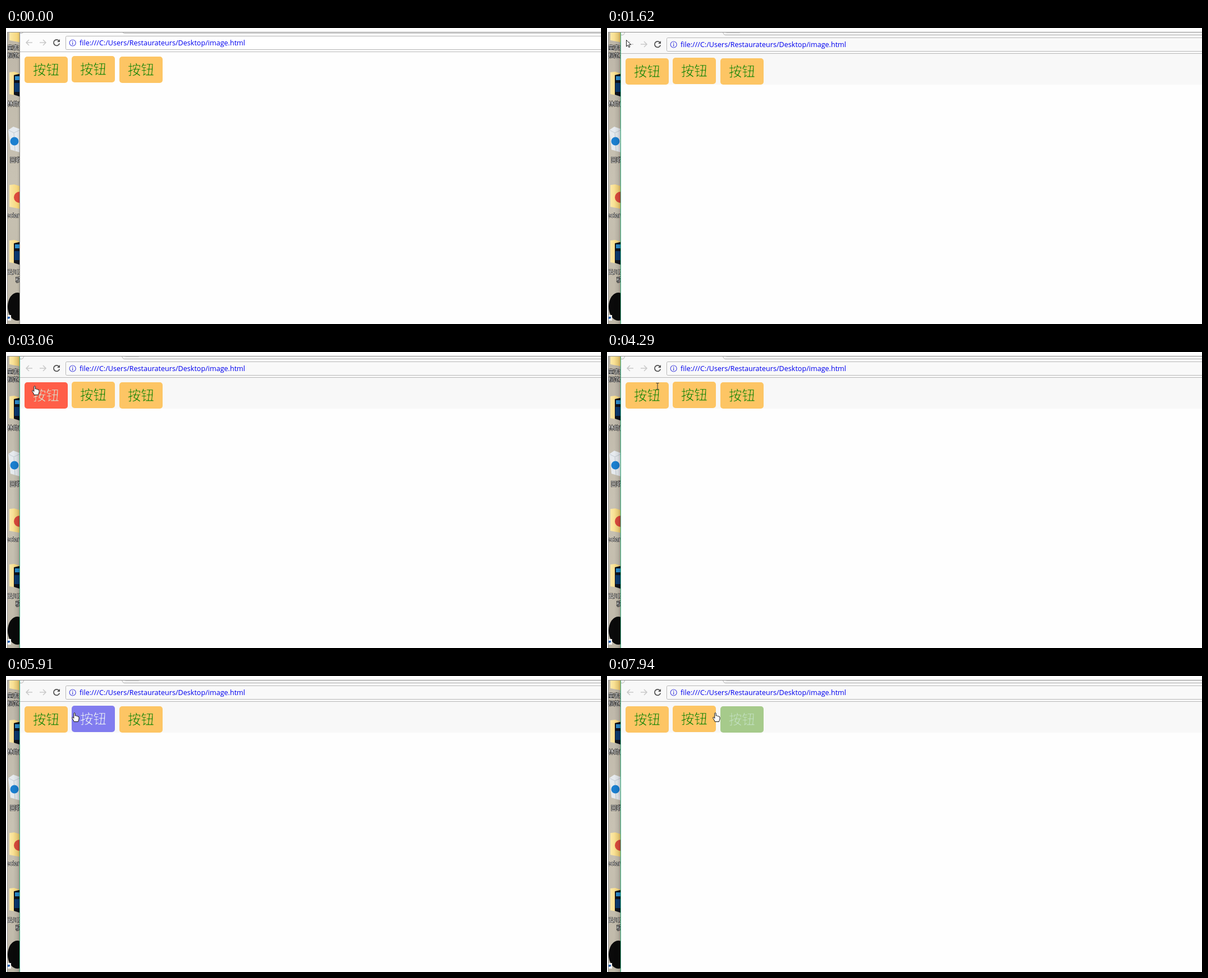
An HTML page that plays this animation: 1060x528 px, repeating every 8 s.

```html
<!DOCTYPE html>
<html lang="zh">
<head>
<meta charset="utf-8">
<title>按钮</title>
<style>
  @property --face { syntax: "<color>"; inherits: false; initial-value: #fdc564; }

  html, body { margin: 0; width: 100%; height: 100%; overflow: hidden; background: #fff; }
  .stage { --loop: 8s; position: relative; width: 1060px; height: 528px; overflow: hidden; background: #fff; }
  .stage > svg { position: absolute; left: 0; top: 0; }

  /* desktop strip */
  .label { font: 10px "Noto Sans CJK SC", "Noto Sans CJK", "Noto Sans", sans-serif; fill: #fff;
    stroke: #000; stroke-width: 1px; paint-order: stroke; }
  .focus { animation: focus var(--loop) step-end infinite; }
  @keyframes focus { 0% { opacity: 0 } 8.125% { opacity: 1 } }

  /* browser window */
  .window { position: absolute; left: 25px; top: 8px; width: 1035px; height: 520px;
    overflow: hidden; background: #fefefe; }
  .page { position: absolute; left: -25px; top: -8px; width: 1060px; height: 528px;
    animation: shift var(--loop) step-end infinite; }
  .page svg { position: absolute; overflow: visible; }
  .band { animation: focusBand var(--loop) step-end infinite; }
  @keyframes shift {
    0% { transform: translateY(0) }
    11.625% { transform: translateY(2px) }
    13.625% { transform: translateY(3px) }
  }
  @keyframes focusBand { 0% { opacity: 0 } 11.625% { opacity: 1 } }
  .url { font: 12.58px "Open Sans", "Noto Sans", sans-serif; fill: #0000f0; }

  /* the outline in the face colour thins the glyphs */
  .btn { position: absolute; width: 77px; height: 47px; top: 51px; border-radius: 5px;
    background: var(--face); color: #008000; -webkit-text-stroke: .6px var(--face);
    text-align: center; white-space: nowrap;
    font: 300 23.4px/45px "Noto Sans CJK SC", "Noto Sans CJK", sans-serif; }
  .b1 { left: 33px; animation: hover1 var(--loop) linear infinite; }
  .b2 { left: 117px; top: 50px; animation: hover2 var(--loop) linear infinite; }
  .b3 { left: 202px; animation: hover3 var(--loop) linear infinite; }

  /* two second ease in, instant reset on leaving */
  @keyframes hover1 {
    0%, 24.875% { --face: #fdc564; color: #008000; animation-timing-function: ease }
    49.875%, 52.874% { --face: #ff4a42; color: #fff }
    52.875%, 100% { --face: #fdc564; color: #008000 }
  }
  @keyframes hover2 {
    0%, 55.25% { --face: #fdc564; color: #008000; animation-timing-function: ease }
    80.25%, 85.999% { --face: #7c79f5; color: #fff }
    86%, 100% { --face: #fdc564; color: #008000 }
  }
  /* the first half of the same ease, cut by the loop */
  @keyframes hover3 {
    0%, 87.5% { --face: #fdc564; color: #008000;
      animation-timing-function: cubic-bezier(.35, .087, .455, .663) }
    100% { --face: #a3ca8d; color: #cce5cc }
  }

  /* pointer */
  .pointer { animation: move var(--loop) linear infinite; }
  @keyframes move {
    0%, 17.37% { transform: translate(26px, -30px) }
    17.375% { transform: translate(26px, -4px) }
    20.25%, 22.125% { transform: translate(34px, 21px) }
    24.875% { transform: translate(41px, 43px) }
    28.5%, 30.6% { transform: translate(48px, 55px) }
    38.25%, 45% { transform: translate(51px, 60px) }
    52.875% { transform: translate(87px, 60px) }
    53.6%, 54.375% { transform: translate(90px, 61px) }
    56.125% { transform: translate(97px, 60px) }
    65.9% { transform: translate(121px, 65px) }
    67.4%, 78.75% { transform: translate(122px, 65px) }
    86% { transform: translate(155px, 64px) }
    87.5% { transform: translate(162px, 64px) }
    89.1% { transform: translate(181px, 64px) }
    95.6%, 100% { transform: translate(193px, 65px) }
  }
  .arrow { animation: arrow var(--loop) step-end infinite; }
  .hand { animation: hand var(--loop) step-end infinite; }
  .beam { animation: beam var(--loop) step-end infinite; }
  @keyframes arrow { 0% { opacity: 1 } 24.875% { opacity: 0 } }
  @keyframes hand {
    0% { opacity: 0 } 24.875% { opacity: 1 } 52.875% { opacity: 0 }
    55.25% { opacity: 1 } 86% { opacity: 0 } 87.5% { opacity: 1 }
  }
  @keyframes beam {
    0% { opacity: 0 } 52.875% { opacity: 1 } 55.25% { opacity: 0 }
    86% { opacity: 1 } 87.5% { opacity: 0 }
  }
</style>
</head>
<body>
<div class="stage">
  <svg width="1060" height="528">
    <defs>
      <linearGradient id="wall" x2="0" y2="1">
        <stop offset="0" stop-color="#bdb6a8"/>
        <stop offset=".5" stop-color="#c8c2b3"/>
        <stop offset="1" stop-color="#c0b9a9"/>
      </linearGradient>
      <linearGradient id="paper">
        <stop offset="0" stop-color="#fbe9a8"/>
        <stop offset="1" stop-color="#f3cd68"/>
      </linearGradient>
      <linearGradient id="shade">
        <stop offset="0" stop-color="#000" stop-opacity="0"/>
        <stop offset="1" stop-color="#000" stop-opacity=".13"/>
      </linearGradient>
      <clipPath id="strip"><path d="M2 8H25V528H2z"/></clipPath>
      <path id="folder" d="M6 1L15 0L27 4V44L6 40z" fill="url(#paper)"/>
      <g id="book">
        <use href="#folder"/>
        <path d="M14 6L27 3V45L14 41z" fill="#10131c"/>
        <path d="M16 8h9v7h-9z" fill="#2d8fd0"/>
        <path d="M15 20h12v16H15z" fill="#0b3a70"/>
      </g>
    </defs>
    <g clip-path="url(#strip)">
      <path d="M2 8H25V528H2z" fill="url(#wall)"/>
      <use href="#folder" y="-18"/>
      <use href="#book" y="78"/>
      <path d="M4 182L13 176L27 181L25 222L8 217z" fill="#e6eaee"/>
      <path d="M4 182L14 187L27 181M14 187L16 219" fill="none" stroke="#c3cbd2"/>
      <circle cx="15" cy="202" r="7.5" fill="#1b7fd0"/>
      <use href="#folder" y="279"/>
      <circle cx="24" cy="302" r="10" fill="#dc4a3d"/>
      <use href="#book" y="378"/>
      <ellipse cx="20" cy="497" rx="17" ry="25" fill="#0a0a0a"/>
      <path d="M2 512h7v10h-7z" fill="#f4f4f4"/>
      <path d="M3 519V515H7V518z" fill="#2a62b0"/>
      <g class="label">
        <text x="2" y="39">童表白</text>
        <text x="2" y="53">规范三</text>
        <text x="2" y="139">林的前</text>
        <text x="7" y="239">回收站</text>
        <text x="1" y="338">eclare</text>
        <text x="2" y="439">云川三</text>
        <text x="17" y="453">稿</text>
      </g>
      <path d="M20 8H25V528H20z" fill="url(#shade)"/>
      <path class="focus" d="M13 8H25V528H13z" fill="url(#shade)"/>
    </g>
    <path d="M2.5 8V528" stroke="#8a8a8a"/>
    <path d="M2 7.5H1060" stroke="#8f8f8f"/>
    <path d="M24.5 8V528" stroke="#8b8a84"/>
    <path class="focus" d="M24.5 8V528" stroke="#3cb483"/>
  </svg>

  <div class="window">
    <div class="page">
      <svg width="1060" height="528">
        <path d="M25 0H1060V42H25z" fill="#fcfcfc"/>
        <path class="band" d="M25 0H1060V98H25z" fill="#f8f8f8"/>
        <path d="M207 0L211 9H1060V0z" fill="#f1f1f1"/>
        <path d="M25 9.5h3q2 0 3-3l2-6M205 0l2 6q1 3.500 4 3.500H1060" fill="none" stroke="#b2b2b2"/>
        <path d="M209 0h24l4 6h-23q-2 0-3-2z" fill="#d2d2d2"/>
        <path d="M25 42.500H1060" stroke="#b8b8b8"/>
        <rect x="106.500" y="14.500" width="970" height="24" rx="2" fill="#fff" stroke="#b4b4b4"/>
        <path class="band" d="M108 16H1060V37H108z" fill="#f9f9f9"/>
        <g fill="none" stroke-width="1.500">
          <path d="M47 26H36M41 21L36 26L41 31M60 26H71M66 21L71 26L66 31" stroke="#c9c9c9"/>
          <path d="M94.500 23A5.300 5.300 0 1 0 95.300 27.500" stroke="#505050" stroke-width="1.700"/>
          <circle cx="118.700" cy="26.500" r="5.500" stroke="#4d4de0" stroke-width="1.200"/>
          <path d="M118.700 25.500V30M118.700 23V24.500" stroke="#4d4de0" stroke-width="1.300"/>
        </g>
        <path d="M96 20V25H91z" fill="#505050"/>
        <text class="url" x="131" y="31">file:///C:/Users/Restaurateurs/Desktop/image.html</text>
      </svg>
      <div class="btn b1">按钮</div>
      <div class="btn b2">按钮</div>
      <div class="btn b3">按钮</div>
    </div>
  </div>

  <svg width="1060" height="528">
    <g class="pointer">
      <path class="arrow" d="M.5 .5V12L3.200 9.500L5 13.500L6.800 12.700L5 8.800H8.700z"
        fill="#fff" stroke="#000" stroke-width=".9"/>
      <path class="hand" d="M-1.200 1.500Q0 -.3 1.200 1.500V6Q2.800 5 3.600 6.500Q5 5.700 5.800 7.200Q8 6.500 8 9V12Q7 14 6.500 16.500H-.8Q-1.500 14 -3.500 11.500Q-5 9 -3.800 8.400Q-2.600 8 -1.200 10.500z"
        fill="#fff" stroke="#111"/>
      <path class="beam" d="M-2.500 -5.500H-.8L0 -5L.8 -5.500H2.500M0 -5V5M-2.500 5.500H-.8L0 5L.8 5.500H2.500"
        fill="none" stroke="#333"/>
    </g>
  </svg>
</div>
</body>
</html>
```
